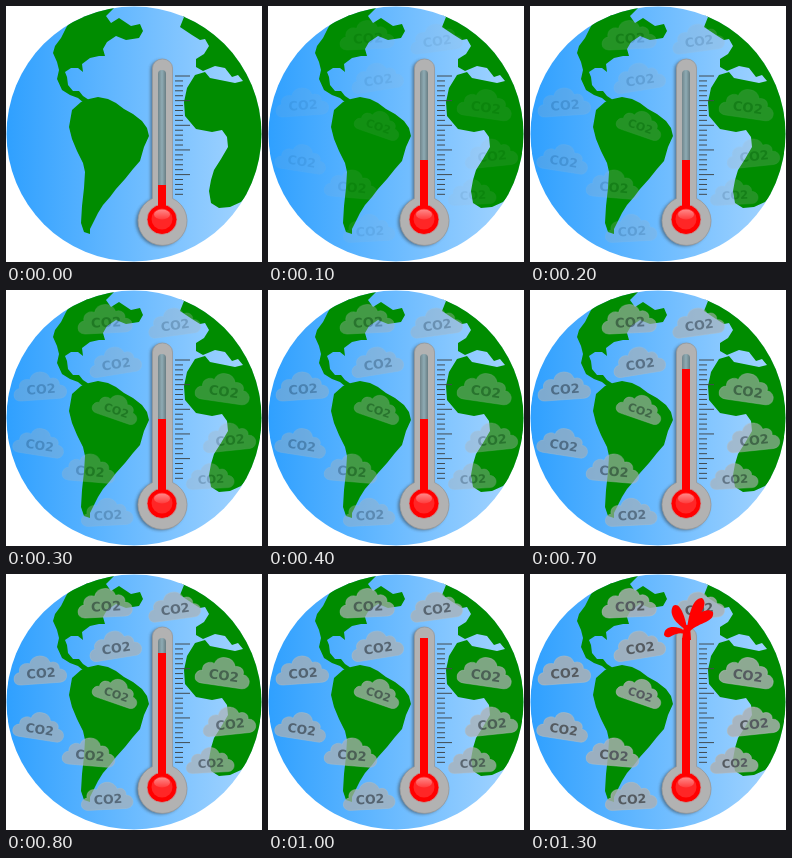
These frames come from a looping animation (256x256 px, 1500 ms). An HTML page:

```html
<!DOCTYPE html>
<html lang="en">
<head>
<meta charset="utf-8">
<title>Warming globe</title>
<style>
  html, body { margin: 0; width: 100%; height: 100%; overflow: hidden; background: #fff; }
  svg { display: block; width: 100%; height: 100%; }
  text { font: bold 13.2px "DejaVu Sans", sans-serif; text-anchor: middle; fill: #555b60; }
</style>
</head>
<body>
<svg viewBox="0 0 256 256">
  <defs>
    <linearGradient id="sea">
      <stop offset="0" stop-color="#2fa0ff"/>
      <stop offset="1" stop-color="#a8d6ff"/>
    </linearGradient>
    <linearGradient id="glass">
      <stop offset="0" stop-color="#71868c"/>
      <stop offset=".5" stop-color="#8eabb4"/>
      <stop offset="1" stop-color="#687d83"/>
    </linearGradient>
    <linearGradient id="shine" x2="0" y2="1">
      <stop offset="0" stop-color="#fff" stop-opacity=".45"/>
      <stop offset="1" stop-color="#fff" stop-opacity=".1"/>
    </linearGradient>
    <filter id="soft"><feGaussianBlur stdDeviation="1.6"/></filter>
    <clipPath id="disc"><circle cx="128" cy="128" r="127.500"/></clipPath>
    <path id="body" d="M146.500 62a10 9 0 0 1 20 0V192.500a24.500 24.500 0 1 1-20 0Z"/>
    <g id="cloud">
      <path d="M-20 12C-30 12-29 0-21-1C-22-9-14-11-10-9C-7-19 8-19 11-9C17-11 21-6 20-2C30-1 29 12 20 12Z"
            fill="#acb0b2" fill-opacity=".82" stroke="#b6bdc0" stroke-opacity=".5"/>
      <text x="1" y="6">CO2</text>
    </g>
  </defs>

  <g clip-path="url(#disc)">
    <rect width="256" height="256" fill="url(#sea)"/>
    <g fill="#008c00">
      <path d="M66 12L60 22 55 32 49 40 47 47 51 56 53 64 51 73 56 84 64 89 72 92 78 97 83 94 77 90 73 85 67 85 62 79 61 71 59 66 65 62 72 62 77 66 76 58 84 52 93 50 99 50 97 43 101 36 110 30 120 34 133 32 137 25 134 18 125 20 113 12 105 17 100 10 110 0 85 0Z"/>
      <path d="M66 104L75 96 83 93 92 91 102 93 110 97 118 103 127 108 136 115 141 122 143 130 138 141 134 155 127 163 119 173 110 183 104 191 97 199 92 207 88 215 84 223 84 228 78 226 75 217 76 200 78 182 79 166 77 157 71 145 66 133 63 121Z"/>
      <path d="M168 4L178 11 174 21 186 29 194 34 199 33 203 40 198 48 190 53 190 61 197 65 209 60 219 62 226 71 232 69 237 75 229 77 219 75 204 72 199 66 189 69 181 82 178 96 179 110 190 123 206 126 216 124 221 131 222 141 215 153 208 164 205 174 203 185 205 197 213 202 224 201 235 196 256 174 256 65 210 0Z"/>
    </g>
  </g>

  <g id="clouds"></g>

  <use href="#body" x="-2" y="1" fill="#333" opacity=".5" filter="url(#soft)"/>
  <use href="#body" fill="#b2b2b2" stroke="#989898" stroke-width=".8"/>
  <path d="M152 68a4 4 0 0 1 8 0V206H152Z" fill="url(#glass)"/>
  <circle cx="156" cy="213.500" r="15" fill="#f00" stroke="#b9a3a3" stroke-width=".8"/>
  <rect id="mercury" x="152" width="8" fill="#f00"/>
  <circle cx="156" cy="213" r="10.500" fill="#ff4040" opacity=".6"/>
  <ellipse cx="156" cy="208.500" rx="8" ry="5" fill="url(#shine)"/>
  <path id="ticks" stroke="#404a50" fill="none"/>

  <g id="splash" fill="#f00">
    <path d="M152 66L154 51H160L161 66Z"/>
    <path d="M156 56C147 50 138 41 143 32C150 27 155 43 157 54Z"/>
    <path d="M157 54C159 42 162 24 172 24C180 31 167 43 160 55Z"/>
    <path d="M155 57C147 51 134 51 134 61C139 68 144 56 155 60Z"/>
    <path d="M158 54C162 43 175 32 183 38C185 48 170 48 160 57Z"/>
  </g>
</svg>
<script>
  const byId = id => document.getElementById(id);
  const clouds = byId("clouds"), mercury = byId("mercury"), splash = byId("splash");

  // x, y, rotation, scale
  clouds.innerHTML = [
    [99, 31, -3, 1], [168, 34, -8, .96], [109, 73, -9, .96], [34, 98, -4, .97],
    [110, 119, 19, .85], [33, 154, 9, .94], [83, 180, 5, .97], [101, 224, -3, .95],
    [217, 100, 8, 1], [223, 149, -6, .97], [204, 188, -3, .88]
  ].map(([x, y, angle, scale]) =>
    `<use href="#cloud" transform="translate(${x} ${y}) rotate(${angle}) scale(${scale})"/>`
  ).join("");

  let ticks = "";
  for (let i = 0; i <= 24; i++) ticks += `M169 ${70 + i * 4.93}h${i % 5 ? 8 : 15}`;
  byId("ticks").setAttribute("d", ticks);

  const start = performance.now();
  function draw(now) {
    const tick = Math.floor(Math.max(0, now - start) % 1500 / 100);
    // The steps at 800 ms and 1300 ms are held twice as long.
    const step = tick < 9 ? tick : Math.min(tick - 1, 12);
    // The clouds thicken at every step, the mercury climbs at every other one.
    const level = Math.ceil(step / 2);
    const top = Math.max(64, 179 - 25 * level);

    clouds.setAttribute("opacity", 1 - (1 - step / 12) ** 1.6);
    mercury.setAttribute("y", top);
    mercury.setAttribute("height", 212 - top);
    splash.setAttribute("visibility", level === 6 ? "visible" : "hidden");
    requestAnimationFrame(draw);
  }
  draw(start);
</script>
</body>
</html>
```
